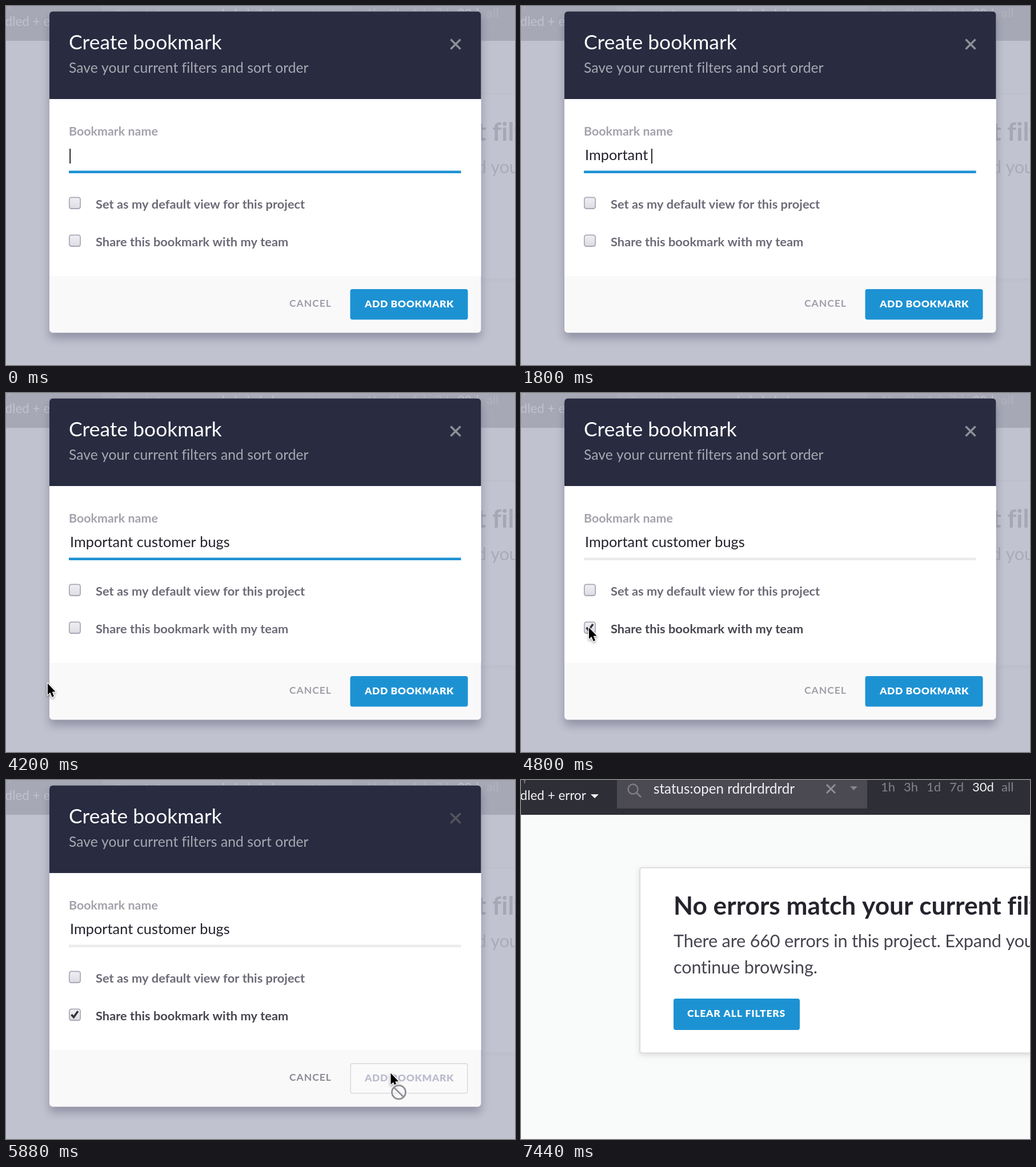
An HTML page with a canvas for the animation above (7.5 s loop, 891 by 629 pixels).

```html
<!DOCTYPE html>
<html lang="en">
<head>
<meta charset="utf-8">
<title>Create bookmark</title>
<style>
  html, body { margin: 0; width: 100%; height: 100%; overflow: hidden; }
  canvas { display: block; }
</style>
</head>
<body>
<canvas id="stage" width="891" height="629"></canvas>
<script>
const ctx = document.getElementById('stage').getContext('2d');
const LOOP = 7500, STEP = 60;
const CHECKED = 4680, HOVER = 5340, SUBMIT = 5520, CLOSED = 5940;
const BLUE = '#1d92d3';
const NAME = 'Important customer bugs';

// A non-zero letter spacing also keeps "fi" from joining into a ligature
function text(str, x, y, size, color, weight = 400, spacing = 0.02, align = 'left') {
  ctx.font = `${weight} ${size}px Lato, "Open Sans", sans-serif`;
  ctx.letterSpacing = spacing + 'px';
  ctx.textAlign = align;
  ctx.fillStyle = color;
  ctx.fillText(str, x, y);
}

function rect(x, y, w, h, fill, radius = 0) {
  ctx.beginPath();
  ctx.roundRect(x, y, w, h, radius);
  ctx.fillStyle = fill;
  ctx.fill();
}

function shape(points, fill) {
  ctx.beginPath();
  points.forEach(p => ctx.lineTo(...p));
  ctx.closePath();
  ctx.fillStyle = fill;
  ctx.fill();
}

function line(points, color, width) {
  ctx.beginPath();
  points.forEach(p => ctx.lineTo(...p));
  ctx.strokeStyle = color;
  ctx.lineWidth = width;
  ctx.stroke();
}

function cross(x, y, r, color, width) {
  line([[x - r, y - r], [x + r, y + r]], color, width);
  line([[x + r, y - r], [x - r, y + r]], color, width);
}

function ring(x, y, r, color, width) {
  ctx.beginPath();
  ctx.arc(x, y, r, 0, Math.PI * 2);
  ctx.strokeStyle = color;
  ctx.lineWidth = width;
  ctx.stroke();
}

function shadow(color, blur, y, draw) {
  ctx.save();
  ctx.shadowColor = color;
  ctx.shadowBlur = blur;
  ctx.shadowOffsetY = y;
  draw();
  ctx.restore();
}

function drawPage() {
  rect(0, 0, 891, 629, '#f9fafa');
  rect(0, 0, 891, 61, '#2e2e36');
  text('Y', 2, 6, 14, '#908f99');
  text('handled + error', 114, 35, 22.4, '#f3f3f5', 400, 0.02, 'right');
  shape([[122, 25], [136, 25], [129, 32]], '#f3f3f5');

  rect(168, 0, 438, 50, '#4b4a53');
  ring(196, 16, 8.5, '#7d7c86', 2.5);
  line([[202, 22], [210, 30]], '#7d7c86', 3);
  text('status:open rdrdrdrdrdr', 232, 24, 24.1, '#f1f1f3');
  cross(542.5, 15.5, 7.5, '#8f8e98', 3);
  shape([[576, 11], [589, 11], [582.5, 18]], '#85848e');

  ['1h', '3h', '1d', '7d', '30d', 'all'].forEach((label, i) =>
    text(label, 630 + i * 40 + (i > 4 ? 11 : 0), 20, 22, i === 4 ? '#f3f3f5' : '#85848e'));

  shadow('rgba(0,0,0,.12)', 8, 3, () => rect(207.5, 153, 760, 326, '#d8d8db', 4));
  rect(209, 154.5, 757, 323, '#fff', 3);
  text('No errors match your current filters', 267, 236, 44.2, '#25242d', 700);
  text('There are 660 errors in this project. Expand your filters to', 267, 293, 30.7, '#46444f', 400, -0.2);
  text('continue browsing.', 267, 339, 30.5, '#46444f', 400, -0.1);
  rect(267, 383, 221, 55, BLUE, 4);
  text('CLEAR ALL FILTERS', 291, 415, 17.5, '#fff', 900, 0.8);
}

function checkbox(y, checked, label) {
  const fill = ctx.createLinearGradient(0, y, 0, y + 21);
  fill.addColorStop(0, '#f1f1f4');
  fill.addColorStop(1, '#dcdbe3');
  rect(110, y, 21, 21.5, '#a8a7b6', 4.5);
  rect(111.7, y + 1.7, 17.6, 17.8, fill, 3);
  if (checked) line([[114.5, y + 10.5], [118.5, y + 15], [126, y + 4.5]], '#35343c', 3.6);
  text(label, 157, y + 20, 21.8, checked ? '#47454f' : '#6c6a77', 700);
}

// Number of characters typed at time t
function typed(t) {
  if (t < 780) return 0;
  if (t < 1860) return Math.min(10, 1 + Math.floor((t - 780) / 105));
  return Math.min(NAME.length, 11 + Math.floor((t - 1860) / 140));
}

function caretVisible(t) {
  if (t >= CHECKED) return false;
  if (t < 780) return t < 540;
  return t < 4080 || t >= 4560;
}

function drawDialog(t) {
  const busy = t >= SUBMIT, checked = t >= CHECKED;
  rect(0, 0, 891, 629, 'rgba(185,186,202,.87)');
  shadow('rgba(40,40,70,.32)', 16, 10, () => rect(76, 9.5, 755.5, 563, '#f9f9fa', 6));
  rect(76, 163, 755.5, 310, '#fff');
  rect(76, 9.5, 755.5, 153.5, '#292b41', [6, 6, 0, 0]);
  text('Create bookmark', 110, 76, 35.4, '#fff');
  text('Save your current filters and sort order', 110, 117, 24.7, '#a8a8b1');
  cross(787, 67, 8.5, busy ? '#55545c' : '#8f8f99', 3.6);

  text('Bookmark name', 110, 227, 21.4, '#a3a1ab', 700);
  const value = NAME.slice(0, typed(t));
  text(value, 112, 270, 25.3, '#22212b');
  if (caretVisible(t)) rect(111.3 + ctx.measureText(value).width, 250, 1.8, 26, '#111');
  rect(110, 288.5, 686.5, 4.5, checked ? '#ebebed' : BLUE);

  checkbox(334.5, false, 'Set as my default view for this project');
  checkbox(400.5, checked, 'Share this bookmark with my team');

  text('CANCEL', 496, 527, 17.5, busy ? '#8b8a95' : '#a09fa9', 700, 1);
  if (busy) {
    rect(602.5, 496, 206, 53.5, '#dadade', 4);
    rect(604, 497.5, 203, 50.5, '#fafafb', 3);
  } else {
    rect(602.5, 496, 206, 53.5, t >= HOVER ? '#1b88c5' : BLUE, 4);
  }
  text('ADD BOOKMARK', 628, 528, 17.5, busy ? '#bcbdcd' : '#fff', 900, 0.6);
}

// Pointer path: [time, x, y], eased between stops
const PATH = [
  [4020, 43, 572], [4440, 119, 411], [4860, 119, 411],
  [5400, 673.5, 513.5], [6300, 673.5, 513.5], [6840, 730, 650]
];

function pointer(t) {
  const i = PATH.findIndex(p => p[0] > t);
  if (i < 1) return null;
  const [t0, x0, y0] = PATH[i - 1], [t1, x1, y1] = PATH[i];
  const u = (t - t0) / (t1 - t0), k = u * u * (3 - 2 * u);
  return [x0 + (x1 - x0) * k, y0 + (y1 - y0) * k];
}

function drawPointer(x, y, blocked) {
  ctx.save();
  ctx.translate(x, y);
  const arrow = [[0, 0], [0, 20], [4.5, 16], [7.8, 24], [11, 22.6], [7.8, 14.8], [13.6, 14.5]];
  ctx.lineJoin = 'round';
  shadow('rgba(0,0,0,.4)', 4, 2, () => line([...arrow, arrow[0], arrow[1]], '#fff', 2.6));
  shape(arrow, '#000');
  if (blocked) {
    const slash = [[5.5, 25], [22.5, 42]];
    ring(14, 33.5, 12, '#fff', 6);
    line(slash, '#fff', 6);
    ring(14, 33.5, 12, '#919199', 3);
    line(slash, '#919199', 3);
  }
  ctx.restore();
}

function frame() {
  const t = Math.floor(performance.now() % LOOP / STEP) * STEP;
  drawPage();
  if (t < CLOSED) drawDialog(t);
  const at = pointer(t);
  if (at) drawPointer(...at, t >= SUBMIT && t < CLOSED);
  requestAnimationFrame(frame);
}
frame();
</script>
</body>
</html>
```
